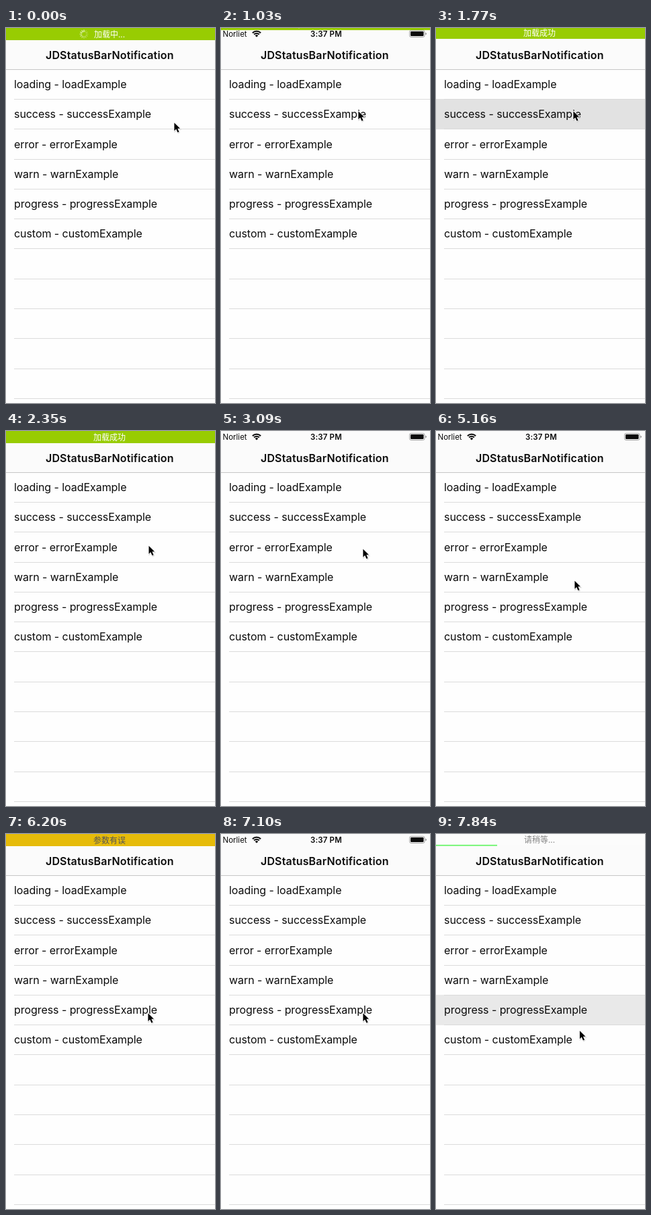
An HTML page that plays this animation: 311 by 555 pixels, repeating every 7.99 s.

```html
<!DOCTYPE html>
<html lang="zh-CN">
<head>
<meta charset="utf-8">
<title>Status bar notifications</title>
<style>
html, body { margin: 0; width: 100%; height: 100%; overflow: hidden; background: #fefefe; }
svg { display: block; width: 311px; height: 555px; }
text { font-family: Inter, Roboto, sans-serif; fill: #0b0b0b; white-space: pre; }
.row { font-size: 16px; letter-spacing: -.06px; }
.title { font-size: 16px; font-weight: 600; letter-spacing: .16px; text-anchor: middle; }
.status { font-size: 11.5px; }
.time { font-weight: 600; letter-spacing: .15px; text-anchor: middle; }
.note { font: 12px "Noto Sans CJK SC", "Noto Sans CJK", sans-serif; text-anchor: middle; }
</style>
</head>
<body>
<svg viewBox="0 0 311 555">
  <g id="list"></g>
  <path d="M0 0H311V61H0z" fill="#fbfbfb"/>
  <path d="M0 61H311V62H0z" fill="#c6c6c6"/>
  <text class="title" x="154.3" y="46">JDStatusBarNotification</text>
  <g id="status">
    <text class="status" x="2.5" y="13">Norliet</text>
    <g fill="none" stroke="#0b0b0b" stroke-width="1.9" transform="translate(53 13.4) scale(1.12)">
      <path d="M-5.45-5.45a7.7 7.7 0 0 1 10.9 0M-3.45-3.45a4.9 4.9 0 0 1 6.9 0"/>
      <path d="M0 0l-2-2a2.8 2.8 0 0 1 4 0z" fill="#0b0b0b" stroke="none"/>
    </g>
    <text class="status time" x="156.5" y="13">3:37 PM</text>
    <rect x="280.5" y="3.5" width="22.5" height="10" rx="2.4" fill="none" stroke="#999" stroke-width=".9"/>
    <rect x="282" y="5" width="19.5" height="7" rx="1.2" fill="#0b0b0b"/>
    <path d="M304.3 6.8q1.6 .4 1.6 1.7t-1.6 1.7z" fill="#888"/>
  </g>
  <g id="notes"></g>
  <g id="cursor">
    <g transform="translate(.4 1.2) scale(.92)">
      <path d="M0 0V13L3 10.2L5.4 15.6L7.8 14.6L5.4 9.4H9.4z" transform="translate(.6 1.2)"
        fill="#0003" stroke="#0002" stroke-width="1.6"/>
      <path d="M0 0V13L3 10.2L5.4 15.6L7.8 14.6L5.4 9.4H9.4z" fill="#000" stroke="#fff"
        stroke-width="2" stroke-linejoin="round" paint-order="stroke"/>
    </g>
  </g>
</svg>
<script>
const LOOP = 7990, ROW = 44.28, BAR = 18, SLIDE = 400;

// [first change, last change, steps]
const BURSTS = [
  [140, 1170, 8], [1470, 2500, 8], [2650, 3090, 4], [3380, 4410, 8],
  [4560, 5160, 5], [5760, 6200, 4], [6800, 7100, 3], [7540, 7840, 3]
];
const ticks = [0];
for (const [from, to, n] of BURSTS)
  for (let i = 0; i < n; i++)
    ticks.push(Math.floor((from + (to - from) * i / (n - 1)) / 10) * 10);

const ROWS = ['loading - loadExample', 'success - successExample', 'error - errorExample',
  'warn - warnExample', 'progress - progressExample', 'custom - customExample'];

const NOTES = [
  { text: '加载中...', bg: '#98cc02', ink: '#fff', start: -1000, end: 730, spin: true },
  { text: '加载成功', bg: '#98cc02', ink: '#fff', start: 1445, end: 2600, row: 1 },
  { text: '加载失败', bg: '#961e00', ink: '#fff', start: 3380, end: 4640, row: 2 },
  { text: '参数有误', bg: '#e6bb09', ink: '#555', start: 5620, end: 6700, row: 3 },
  { text: '请稍等...', bg: '#fcfcfc', ink: '#858585', start: 7460, end: 9000, row: 4, progress: true }
];

// [time, x, y]
const PATH = [
  [0, 250, 139], [140, 249, 139], [900, 204, 122], [1770, 204, 122], [2500, 213, 174],
  [2650, 213, 174], [3090, 211, 173.5], [3530, 211, 173.5], [3960, 222, 246], [4110, 218, 238.5],
  [4410, 210, 225], [4710, 206, 220.5], [5760, 206, 220.5], [6200, 211, 264], [7540, 211, 264],
  [7840, 213.5, 290], [LOOP, 213.5, 290]
];

const $ = id => document.getElementById(id);
const clamp = v => Math.min(1, Math.max(0, v));
const ease = v => (1 - Math.cos(Math.PI * clamp(v))) / 2;

function add(parent, tag, attrs, text) {
  const el = document.createElementNS('http://www.w3.org/2000/svg', tag);
  for (const k in attrs) el.setAttribute(k, attrs[k]);
  if (text) el.textContent = text;
  return parent.appendChild(el);
}

for (let i = 0; i < 11; i++)
  add($('list'), 'rect', { x: 12, y: Math.round(105 + ROW * i), width: 299, height: 1, fill: '#dcdcdc' });

const lights = ROWS.map((_, i) => add($('list'), 'rect',
  { y: Math.round(105 + ROW * (i - 1)), width: 311, height: 45, fill: '#d9d9d9', opacity: 0 }));
ROWS.forEach((s, i) => add($('list'), 'text', { class: 'row', x: 12, y: 89 + ROW * i }, s));

for (const n of NOTES) {
  n.el = add($('notes'), 'g');
  add(n.el, 'rect', { width: 311, height: BAR, fill: n.bg });
  add(n.el, 'text', { class: 'note', x: 154, y: 13.5, style: `fill:${n.ink}` }, n.text);
  if (n.spin) {
    n.rays = [...Array(12).keys()].map(i => add(n.el, 'path', {
      d: 'M0-3.5V-6', stroke: '#fff', 'stroke-width': 1.1, 'stroke-linecap': 'round',
      transform: `translate(116 9) rotate(${i * 30})`
    }));
  }
  if (n.progress) n.line = add(n.el, 'rect', { y: 16, height: 1.8, fill: '#6cf56c' });
}

function cursorAt(t) {
  let i = 1;
  while (i < PATH.length - 1 && t > PATH[i][0]) i++;
  const [t0, x0, y0] = PATH[i - 1], [t1, x1, y1] = PATH[i];
  const k = ease((t - t0) / (t1 - t0));
  return [x0 + (x1 - x0) * k, y0 + (y1 - y0) * k];
}

function draw(t) {
  for (const n of NOTES) {
    const shown = ease((t - n.start) / SLIDE) - ease((t - n.end) / SLIDE);
    n.el.setAttribute('transform', `translate(0 ${(shown - 1) * BAR})`);
    n.el.setAttribute('visibility', shown > .005 ? 'visible' : 'hidden');
    if (n.row) {
      const dt = t - n.start;
      lights[n.row].setAttribute('opacity', dt < 0 ? 0 : clamp((570 - dt) / 340));
    }
    if (n.spin) {
      const head = Math.floor(t / 1000 * 12);
      n.rays.forEach((ray, i) =>
        ray.setAttribute('opacity', Math.max(.3, 1 - ((head - i) % 12 + 12) % 12 / 12)));
    }
    if (n.progress) n.line.setAttribute('width', 91 * clamp((t - n.start) / 380));
  }
  $('cursor').setAttribute('transform', `translate(${cursorAt(t)})`);
}

const begin = performance.now();
function frame() {
  const t = (performance.now() - begin) % LOOP;
  draw(ticks.findLast(v => v <= t));
  requestAnimationFrame(frame);
}
frame();
</script>
</body>
</html>
```
